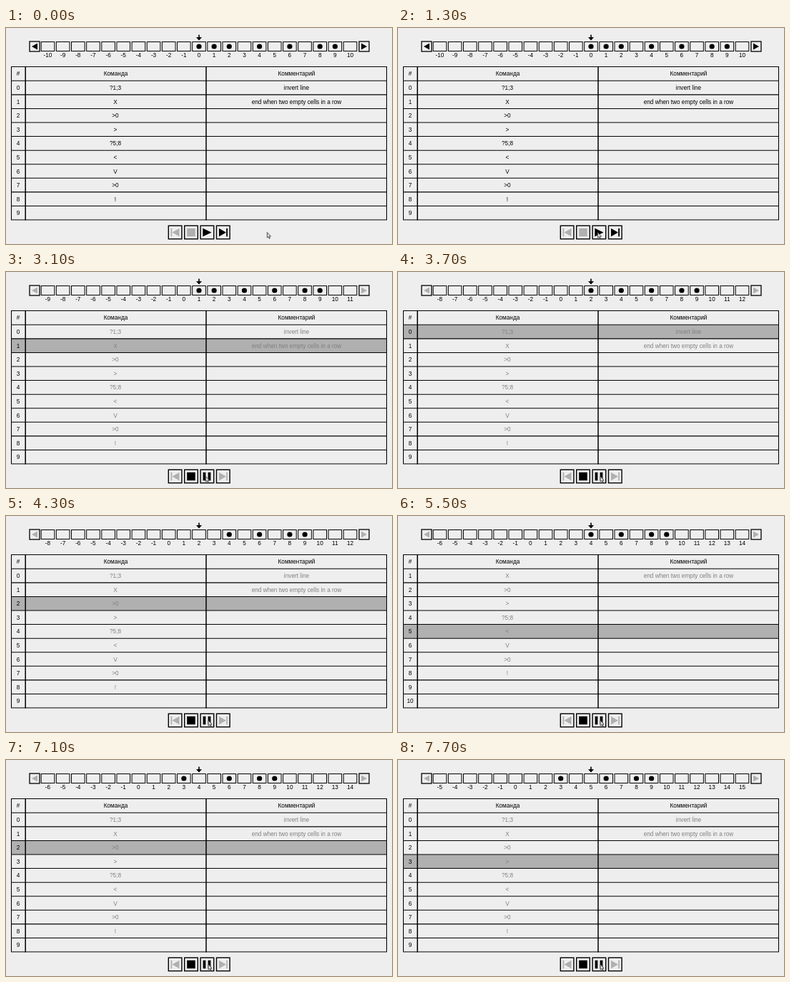
These frames come from a looping animation (540 by 304 pixels, 8 s). An HTML page:

```html
<!DOCTYPE html>
<html lang="ru">
<head>
<meta charset="utf-8">
<title>Post machine</title>
<style>
html, body { margin: 0; width: 100%; height: 100%; overflow: hidden; background: #eee; }
svg { display: block; width: 540px; height: 304px; font: 8.25px "Liberation Sans", Arial, sans-serif; text-anchor: middle; }
</style>
</head>
<body>
<svg id="stage" viewBox="0 0 540 304"></svg>
<script>
const LOOP = 8000, START = 1700;
const BLACK = '#000', DIM = '#b0b0b0', GREY = '#808080', PAPER = '#eee';
const PITCH = 21.15, ROW = 19.57, TOP = 74.3;
const program = ['?1;3', 'X', '>0', '>', '?5;8', '<', 'V', '>0', '!'];
const notes = ['invert line', 'end when two empty cells in a row'];
const stepTimes = [2000, 2300, 2700, 3100, 3300, 3700, 4000, 4300, 4600, 4900,
  5200, 5500, 5800, 6200, 6500, 6800, 7100, 7400, 7700];

const stage = document.getElementById('stage');

function add(tag, attrs, text) {
  const el = document.createElementNS('http://www.w3.org/2000/svg', tag);
  for (const key in attrs) el.setAttribute(key, attrs[key]);
  if (text !== undefined) el.textContent = text;
  return stage.appendChild(el);
}
const label = (x, y, text = '') => add('text', { x, y: y + 3, fill: BLACK }, text);
const shape = (d, fill = BLACK) => add('path', { d, fill });
const box = (x, y, width, height, line) =>
  add('rect', { x, y, width, height, fill: PAPER, stroke: BLACK, 'stroke-width': line });
const paint = (el, fill) => el.setAttribute('fill', fill);
const show = (el, on) => el.setAttribute('visibility', on ? 'visible' : 'hidden');

// Tape
box(33, 19, 14, 14, 1.3);
box(494, 19, 14, 14, 1.3);
const arrows = [shape('M36 26L44 21.5V30.5Z'), shape('M505 26L497 21.5V30.5Z')];
shape('M269.2 9.5H270.8V13H274L270 17.6L266 13H269.2Z');
const cells = Array.from({ length: 21 }, (_, i) => {
  const x = 270 + (i - 10) * PITCH;
  box(x - 9.3, 19.5, 18.6, 13, 1);
  return {
    dot: add('circle', { cx: x, cy: 26, r: 3.6, fill: BLACK }),
    num: label(x, 38.3)
  };
});

// Table
const bar = add('rect', { x: 7.5, width: 525, height: ROW, fill: DIM });
const rows = Array.from({ length: 10 }, (_, i) => {
  const y = TOP + (i + 0.5) * ROW;
  return { num: label(17, y), cmd: label(153, y), note: label(406.5, y) };
});
label(17, 64.2, '#');
label(153.5, 64.2, 'Команда');
label(406.5, 64.2, 'Комментарий');
let grid = 'M7.5 54.5H532.5V270H7.5Z';
for (let i = 0; i < 10; i++) grid += `M7.5 ${TOP + i * ROW}H532.5`;
add('path', { d: grid, fill: 'none', stroke: BLACK, 'stroke-width': 1.05 });
add('path', { d: 'M27.2 54V270.5M280 54V270.5', stroke: BLACK, 'stroke-width': 1.5 });

// Buttons
for (let i = 0; i < 4; i++) box(227.3 + i * 22.4, 278.3, 18.6, 18.6, 1.4);
shape('M230.5 282H232.3V293.4H230.5ZM242.5 282V293.4L232.5 287.7Z', DIM);
const stop = shape('M253.2 282H264.8V293.4H253.2Z');
const play = shape('M275.3 281.8L287.5 287.7L275.3 293.6Z');
const pause = shape('M275.6 282H279.4V293.4H275.6ZM282.6 282H286.4V293.4H282.6Z');
const next = shape('M298 282L308 287.7L298 293.4ZM308.2 282H310V293.4H308.2Z');
const cursor = add('path', {
  d: 'M0 0V7.6L1.7 6.1L2.9 8.8L4.1 8.3L3 5.6H5.2Z',
  fill: '#ddd', stroke: '#333', 'stroke-width': 0.8
});

// Runs the program for the given number of steps
function run(steps) {
  const marks = new Set([0, 1, 2, 4, 6, 8, 9]);
  let head = 0, line = 0;
  while (steps-- > 0) {
    const [, op, a, b] = program[line].match(/^(.)(\d*);?(\d*)/);
    if (op === '!') break;
    if (op === '?') {
      line = Number(marks.has(head) ? a : b);
      continue;
    }
    if (op === 'X') marks.delete(head);
    if (op === 'V') marks.add(head);
    if (op === '>') head++;
    if (op === '<') head--;
    line = a ? Number(a) : line + 1;
  }
  return { marks, head, line };
}

function ease(t, from, to) {
  const p = Math.min(1, Math.max(0, (t - from) / (to - from)));
  return p * p * (3 - 2 * p);
}

function draw(t) {
  const steps = stepTimes.filter(s => s <= t).length;
  const { marks, head, line } = run(steps);
  const running = t >= START, locked = steps > 0;
  const scroll = Math.max(0, line - 4);

  cells.forEach((cell, i) => {
    const pos = head + i - 10;
    cell.num.textContent = pos;
    show(cell.dot, marks.has(pos));
  });
  rows.forEach((row, i) => {
    const n = i + scroll;
    row.num.textContent = n;
    row.cmd.textContent = program[n] || '';
    row.note.textContent = notes[n] || '';
    paint(row.cmd, locked ? GREY : BLACK);
    paint(row.note, locked ? GREY : BLACK);
  });
  arrows.forEach(a => paint(a, locked ? DIM : BLACK));

  show(bar, running);
  bar.setAttribute('y', TOP + (line - scroll) * ROW);
  paint(stop, running ? BLACK : DIM);
  paint(next, running ? DIM : BLACK);
  show(play, !running);
  show(pause, running);

  const x = 365.3 - 86 * ease(t, 350, 1250) + 3.7 * ease(t, 3250, 3400);
  cursor.setAttribute('transform', `translate(${x} 287.6)`);
}

const origin = performance.now();
function tick() {
  draw((performance.now() - origin) % LOOP);
  requestAnimationFrame(tick);
}
tick();
</script>
</body>
</html>
```
